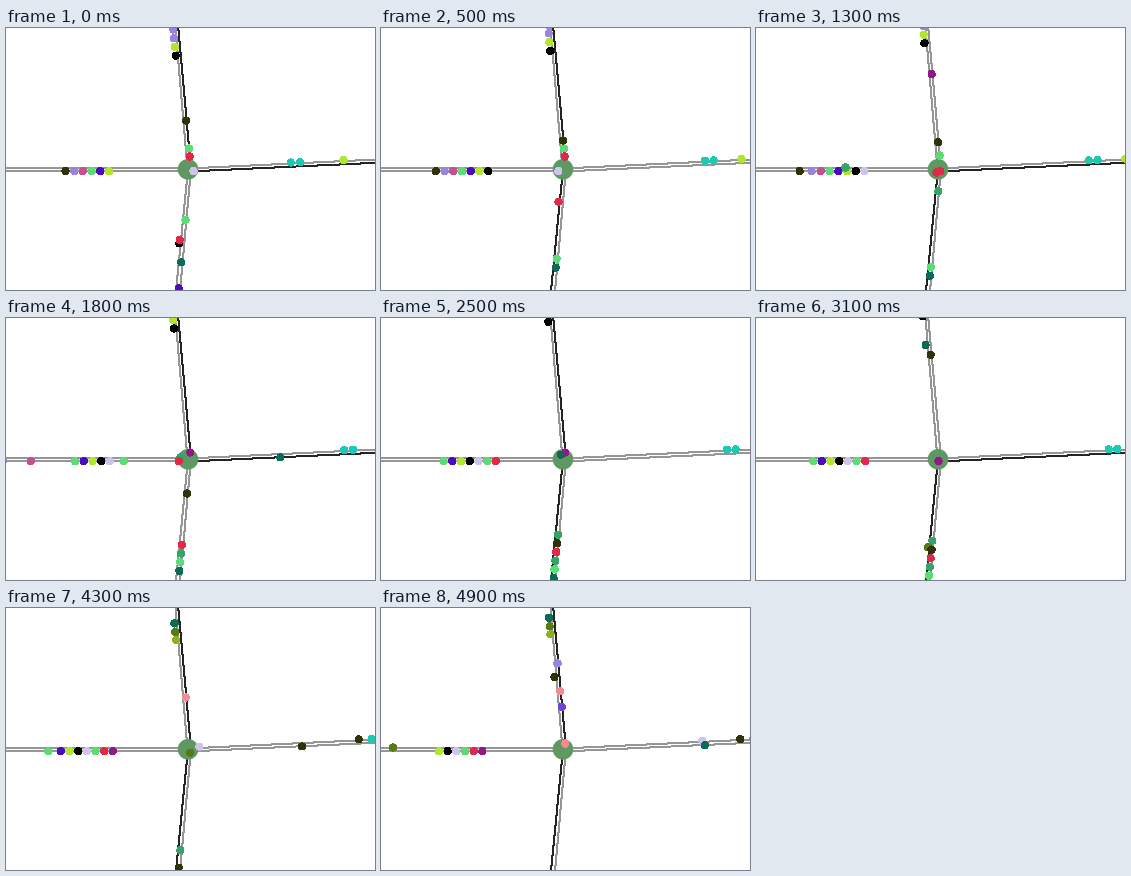
Recreate the animation shown at these times as a matplotlib script. Size 369 px wide and 262 px high, loop 5000 ms.

```python
import matplotlib.pyplot as plt
from matplotlib.animation import FuncAnimation
from matplotlib.patches import Circle

W, H, DPI, FRAMES = 369, 262, 100, 50
GRAY, BLOCKED = "#969696", "#242424"
SPEED, ACCEL, SPACING = 31, 3.5, 8.7      # pixels and frames
GREEN_FRAMES = 7

DARK, PURPLE, PINK, GREEN = "#30330a", "#9b84dc", "#c4508e", "#5cdc74"
INDIGO, LIME, LAVENDER, RED = "#4a0cc0", "#b0e62e", "#cdc4ea", "#e22848"
CYAN, TEAL, MOSS, MAGENTA = "#1ccab4", "#0e6a58", "#34a468", "#92188a"
OLIVE, LEAF, SALMON, VIOLET = "#587a12", "#8cb01e", "#f08c92", "#6a48d4"

# Lanes: point at the hub, then the step per pixel travelled away from it
INBOUND = {"N": (184.4, 141, -.0975, -1), "S": (180.2, 141, -.1, 1),
           "W": (182, 139, -1, 0), "E": (182, 142.8, 1, -.043)}
OUTBOUND = {"N": (179.6, 141, -.092, -1), "S": (184, 141, -.1, 1),
            "W": (182, 142.6, -1, 0), "E": (182, 138.6, 1, -.045)}
EDGE = {"N": 145, "S": 125, "W": 186, "E": 191}
# Exit queues: distance of the first slot from the hub, creep per frame
QUEUE = {"N": (140, .95), "S": (119, 1.03), "W": (123, .92), "E": (172.5, 1.1)}

fig = plt.figure(figsize=(W / DPI, H / DPI), dpi=DPI, facecolor="white")
ax = fig.add_axes([0, 0, 1, 1])
ax.set_xlim(0, W)
ax.set_ylim(H, 0)
ax.axis("off")


def road(x0, y0, x1, y1):
    return ax.plot([x0, x1], [y0, y1], color=GRAY, lw=72 / DPI, snap=False,
                   antialiased=False, zorder=1)[0]


road(0, 140, 182, 140)
road(0, 143, 182, 143)
road(169.5, 0, 181.5, 141)
road(182, 140.5, 370, 131.5)
road(185, 141, 174, 263)
signals = {"N": road(172.3, 0, 185, 141),
           "E": road(182, 143.5, 370, 134.8),
           "S": road(182, 141, 170, 263)}
ax.add_patch(Circle((182, 141.3), 10.3, color="#5f9862", lw=0, zorder=2))


def launch(t):
    """Distance covered t frames after pulling away from rest."""
    return ACCEL * max(t, 0) ** 2 / 2


class Car:
    def __init__(self, color, route, slot=0, enter=-30, stop=None,
                 go=FRAMES, leave=FRAMES, speed=SPEED):
        self.start, self.exit = route
        self.slot, self.enter, self.speed = slot, enter, speed
        self.stop, self.go, self.leave = stop, go, leave
        self.dot = ax.add_patch(Circle((0, 0), 3.55, fc=color, lw=0,
                                       antialiased=False, zorder=3))

    def distance(self, frame):
        """Pixels past the hub; negative while approaching."""
        s = self.speed * (frame - self.enter) - EDGE[self.start]
        if self.stop is not None:
            s = min(s, self.stop) + launch(frame - self.go)
        front, creep = QUEUE[self.exit]
        place = front - SPACING * self.slot + creep * frame
        return min(s, place + launch(frame - self.leave))

    def move(self, frame):
        s = self.distance(frame)
        x, y, dx, dy = INBOUND[self.start] if s < 0 else OUTBOUND[self.exit]
        self.dot.center = x + abs(s) * dx + .5, y + abs(s) * dy + .5


cars = [
    # Leaving west
    Car(DARK, "EW", 0, leave=11.5),
    Car(PURPLE, "EW", 1, leave=12.4),
    Car(PINK, "EW", 2, leave=13.5),
    Car(GREEN, "EW", 3, leave=41.5),
    Car(INDIGO, "EW", 4, leave=43.4),
    Car(LIME, "EW", 5),
    Car("black", "SW", 6, enter=-1.65),
    Car(LAVENDER, "EW", 7, stop=-5, go=2.6),
    Car(GREEN, "NW", 8, stop=-21, go=11),
    Car(MOSS, "WS", 8, enter=10, stop=-8, go=18, leave=41),
    Car(RED, "SW", 9, enter=-7.2, speed=7.6, stop=-3, go=15.3),
    Car(MAGENTA, "NW", 10, enter=11.4, stop=-7, go=29),
    # Leaving north
    Car(PURPLE, "SN", 0),
    Car(PURPLE, "SN", 1),
    Car(LIME, "SN", 2),
    Car("black", "SN", 3),
    Car(TEAL, "EN", 6.3, enter=14.8, stop=-6, go=22.5),
    Car(OLIVE, "SN", 7.3, enter=29.8),
    Car(LEAF, "SN", 8.2, enter=33.1),
    Car(DARK, "EN", 9.2, enter=40.5),
    # Leaving south
    Car(INDIGO, "NS", 0),
    Car(TEAL, "NS", 3),
    Car(GREEN, "NS", 4, enter=-6.3),
    Car(MOSS, "WS", 5, enter=6.3, leave=38),
    Car(RED, "NS", 6, stop=-13, go=10.1, leave=39),
    Car(DARK, "NS", 7, enter=-3.1, stop=-29, go=12, leave=40),
    Car(OLIVE, "WS", enter=36.9),
    # Leaving east
    Car(LIME, "WE", 0, enter=-11),
    Car(CYAN, "WE", 3.2, enter=-9.6),
    Car(CYAN, "WE", 4.2, enter=-9.3),
    Car(DARK, "NE", 5.7, enter=29.7),
    Car(LAVENDER, "SE", 6.7, enter=34.1, stop=-6, go=39.9),
    # Arriving
    Car(TEAL, "EN", enter=47.4),
    Car(OLIVE, "WS", enter=48.5),
    Car(SALMON, "NS", enter=40, stop=-6),
    Car(VIOLET, "NS", enter=45.7),
    Car(SALMON, "NS", enter=46.2),
    Car(PURPLE, "NS", enter=47.1),
]


def update(frame):
    moving = "ENS"[(frame - 1) // GREEN_FRAMES % 3]
    for side, line in signals.items():
        line.set_color(GRAY if side == moving else BLOCKED)
    for car in cars:
        car.move(frame)
    return [*signals.values(), *(car.dot for car in cars)]


anim = FuncAnimation(fig, update, frames=FRAMES, interval=100,
                     repeat=True, repeat_delay=0, blit=False)
plt.show()
```
